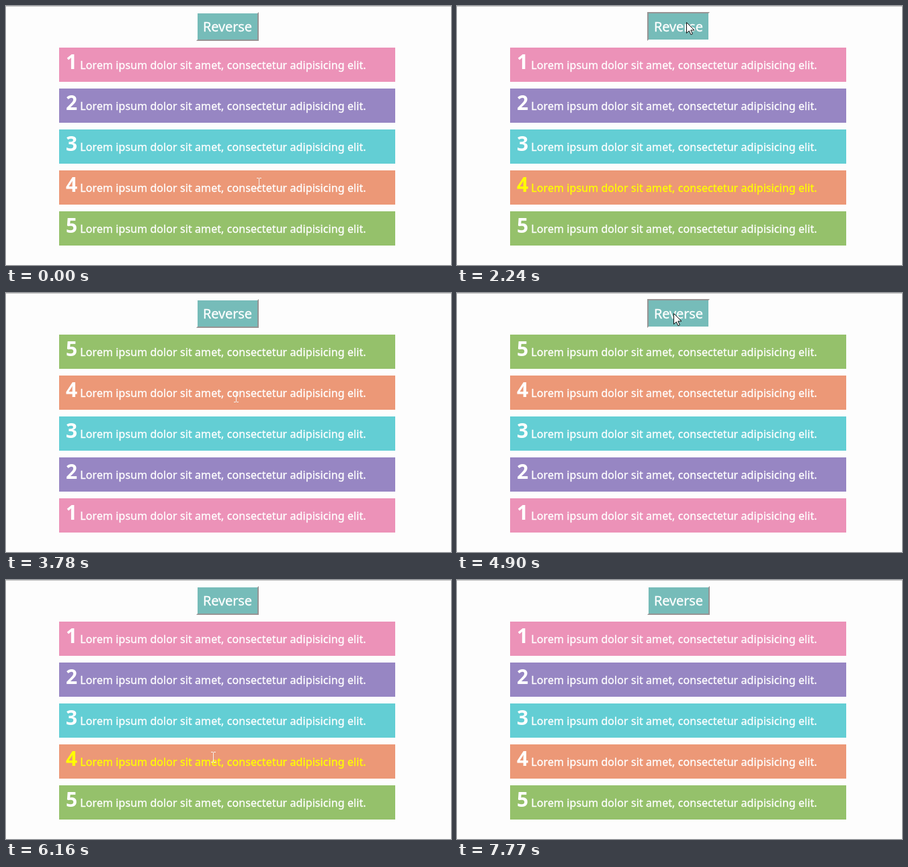
An HTML page for the animation above (8.19 s loop, 662 by 386 pixels).

```html
<!DOCTYPE html>
<html lang="en">
<head>
<meta charset="utf-8">
<title>Reverse list</title>
<style>
  html, body { margin: 0; width: 100%; height: 100%; overflow: hidden; }
  body { background: #fdfdfd; font: 16px "Noto Sans", "Open Sans", sans-serif; color: #fff; }
  #stage { position: relative; width: 662px; height: 386px; overflow: hidden; }
  #stage::before { content: ""; position: absolute; inset: 0 0 auto; height: 1px; background: #c1c1c1; }
  #button, li span { -webkit-text-stroke: .3px; }
  #button {
    --light: #fbfbfb; --dark: #979494;
    position: absolute; left: 283px; top: 9px; width: 89px; height: 39px;
    border: 2px solid; border-color: var(--light) var(--dark) var(--dark) var(--light);
    background: #76bcb9; font-size: 20px; line-height: 39px;
    text-align: center; letter-spacing: -.15px;
  }
  #button.down { border-color: var(--dark) var(--light) var(--light) var(--dark); }
  #list {
    position: absolute; left: 79px; top: 62px; width: 500px;
    display: flex; flex-direction: column; gap: 10px;
    margin: 0; padding: 0; list-style: none;
  }
  #list.reversed { flex-direction: column-reverse; }
  li { height: 41px; padding: 0 10px 10px; white-space: nowrap; }
  li.on { color: #ff0; }
  li b { font-size: 30px; }
  li span { letter-spacing: .08px; }
  #cursor { position: absolute; left: 0; top: 0; overflow: visible; }
</style>
</head>
<body>
<div id="stage">
  <div id="button">Reverse</div>
  <ul id="list"></ul>
  <svg id="cursor" width="1" height="1">
    <path id="arrow" d="M.5 .5V16.5L4.3 13L7 18.7L9.4 17.6L6.8 12H12Z" fill="#fff" stroke="#111"/>
    <path id="beam" d="M-3 -7.5H0M1 -7.5H4M.5 -7V7M-3 7.5H0M1 7.5H4" fill="none" stroke="#f4f1ee"/>
  </svg>
</div>
<script>
const LOOP = 8190, TICK = 70;
const $ = id => document.getElementById(id);
const colors = ["#ec92b8", "#9786c3", "#63ced4", "#ec9877", "#95c16b"];

$("list").innerHTML = colors.map((color, i) =>
  `<li style="background:${color}"><b>${i + 1}</b> <span>Lorem ipsum dolor sit amet, consectetur adipisicing elit.</span></li>`
).join("");
const fourth = $("list").children[3];

const textClicks = [1050, 3780, 6160, 7210];
const presses = [{ down: 2240, up: 2310 }, { down: 4900, up: 5110 }];

// The pointer glides to each place between two times
const home = { x: 376, y: 264 };
const glides = [
  { from: 70, to: 420, x: 371, y: 269 },
  { from: 1610, to: 2030, x: 341, y: 24 },
  { from: 2730, to: 3360, x: 342, y: 155 },
  { from: 4200, to: 4620, x: 322, y: 30 },
  { from: 5390, to: 5880, x: 308, y: 264 },
  { from: 6440, to: 7070, x: 410, y: 272 },
  { from: 7210, to: 7700, x: 578, y: 353 }
];
const leave = 7770;

const ease = p => p * p * (3 - 2 * p);
const isOdd = (times, t) => times.filter(time => time <= t).length % 2 === 1;

function pointer(t) {
  const now = Math.floor(t / TICK + 1) * TICK;
  let { x, y } = home;
  for (const g of glides) {
    const p = (now - g.from) / (g.to + TICK - g.from);
    const k = ease(Math.max(0, Math.min(1, p)));
    x += (g.x - x) * k;
    y += (g.y - y) * k;
  }
  return [Math.round(x), Math.round(y)];
}

function overText(x, y) {
  const row = (y - 62) % 61;
  return x >= 89 && x <= 536 && y >= 62 && row >= 4 && row < 44;
}

function draw(t) {
  $("list").classList.toggle("reversed", isOdd(presses.map(p => p.up), t));
  fourth.classList.toggle("on", isOdd(textClicks, t));
  $("button").classList.toggle("down", presses.some(p => t >= p.down && t < p.up));

  const [x, y] = pointer(t);
  const text = overText(x, y);
  $("cursor").style.transform = `translate(${x}px, ${y}px)`;
  $("cursor").style.display = t < leave ? "" : "none";
  $("beam").style.display = text ? "" : "none";
  $("arrow").style.display = text ? "none" : "";
}

const start = performance.now();
function frame() {
  draw((performance.now() - start) % LOOP);
  requestAnimationFrame(frame);
}
frame();
</script>
</body>
</html>
```
